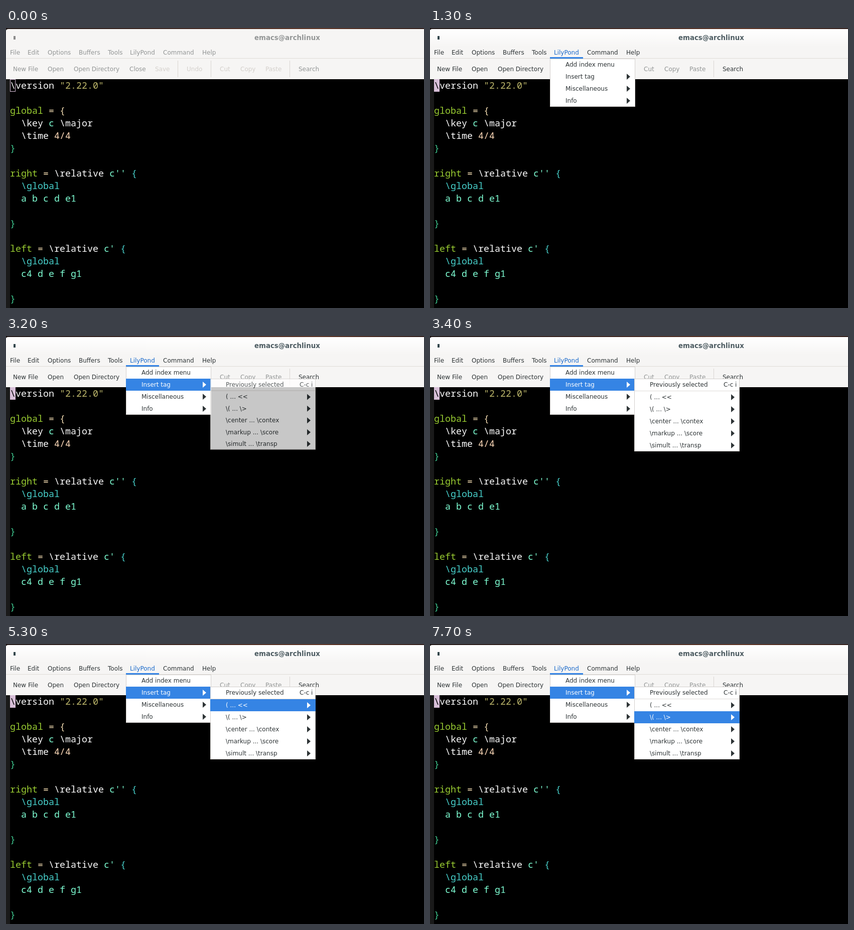
Write an HTML page that moves like this. It is 833 px wide and 558 px high and loops after 8000 ms.

```html
<!DOCTYPE html>
<html lang="en">
<head>
<meta charset="utf-8">
<title>Editor menu</title>
<style>
  html, body { margin: 0; width: 100%; height: 100%; overflow: hidden; background: #000; }
  svg { display: block; width: 833px; height: 558px; }
  text { white-space: pre; font: 12px "DejaVu Sans", sans-serif; }
  .code { font: 18.33px "Noto Sans Mono", monospace; }
  .title { font: bold 13.33px "DejaVu Sans", sans-serif; }
</style>
</head>
<body>
<svg id="stage" viewBox="0 0 833 558">
  <defs>
    <linearGradient id="desk">
      <stop offset="0" stop-color="#1d1413"/><stop offset=".45" stop-color="#3a211b"/>
      <stop offset=".75" stop-color="#5a3020"/><stop offset="1" stop-color="#2c1a17"/>
    </linearGradient>
    <linearGradient id="bar" x2="0" y2="1">
      <stop offset="0" stop-color="#fff"/><stop offset="1" stop-color="#f6f5f4"/>
    </linearGradient>
  </defs>
</svg>
<script>
const LOOP = 8000;
const BLUE = '#3584e4', INK = '#2e3436', PALE = '#929595', FAINT = '#d4d0cc';
const stage = document.getElementById('stage');

function add(parent, tag, attrs, content) {
  const el = document.createElementNS('http://www.w3.org/2000/svg', tag);
  set(el, attrs);
  if (content !== undefined) el.textContent = content;
  parent.appendChild(el);
  return el;
}
function set(el, attrs) {
  for (const key in attrs) el.setAttribute(key, attrs[key]);
}
const rect = (parent, x, y, width, height, fill) =>
  add(parent, 'rect', { x, y, width, height, fill });
const label = (parent, x, y, text, fill = INK, cls = '') =>
  add(parent, 'text', { x, y, fill, class: cls }, text);

function mix(a, b, k) {
  const part = (c, i) => parseInt(c.slice(i, i + 2), 16);
  return `rgb(${[1, 3, 5].map(i => Math.round(part(a, i) + (part(b, i) - part(a, i)) * k))})`;
}

// Window frame
rect(stage, 0, 0, 833, 558, '#000');
rect(stage, 0, 0, 833, 3, 'url(#desk)');
add(stage, 'path', { d: 'M0 102V5Q1 2 5 2H833V102Z', fill: '#f6f5f4' });
const shine = add(stage, 'path', { d: 'M0 38V5Q1 2 5 2H833V38Z', fill: 'url(#bar)' });
rect(stage, 0, 60, 833, 1, '#dfdcd8');
for (const x of [342, 408, 565]) rect(stage, x, 65, 1, 33, '#d9d5d1');
rect(stage, 0, 102, 8, 456, '#1a1a1a');

// Labels that darken when the window gains focus
const inks = [];
function ink(el, off, on) { inks.push({ el, off, on }); return el; }
ink(rect(stage, 15, 16, 4, 7), '#8b8b8b', '#34474c');
ink(label(stage, 495, 24, 'emacs@archlinux', PALE, 'title'), PALE, '#4b5a60');
[[8, 'File'], [43, 'Edit'], [83, 'Options'], [145, 'Buffers'], [203, 'Tools'],
 [247, 'LilyPond'], [313, 'Command'], [391, 'Help']].forEach(([x, text]) =>
  ink(label(stage, x, 53, text), PALE, text === 'LilyPond' ? '#1b6acb' : INK));
[[14, 'New File'], [83, 'Open'], [135, 'Open Directory'], [246, 'Close'], [583, 'Search']]
  .forEach(([x, text]) => ink(label(stage, x, 86, text), PALE, INK));
[[297, 'Save'], [360, 'Undo'], [426, 'Cut'], [467, 'Copy'], [517, 'Paste']]
  .forEach(([x, text]) => ink(label(stage, x, 86, text), FAINT, PALE));
const underline = rect(stage, 239, 58, 66, 3, BLUE);

// Code buffer: row, column, colour, text
const WHITE = '#fff', NAME = '#9acd32', NOTE = '#7fffd4', TEAL = '#48d1cc',
  BRACE = '#3fc890', STRING = '#bdb76b', NUMBER = '#ffdab9', WHEAT = '#f5deb3';
const cursorFill = rect(stage, 8, 102, 11, 25, '#d8bfd8');
const cursorBox = add(stage, 'rect',
  { x: 8.5, y: 102.5, width: 10, height: 24, fill: 'none', stroke: '#d8bfd8' });
const code = ([row, col, fill, text]) =>
  label(stage, 8 + col * 11, 121 + row * 25, text, fill, 'code');
const slash = code([0, 0, WHITE, '\\']);
[
  [0, 1, WHITE, 'version'], [0, 9, STRING, '"2.22.0"'],
  [2, 0, NAME, 'global'], [2, 7, WHEAT, '='], [2, 9, WHEAT, '{'],
  [3, 2, WHITE, '\\key'], [3, 7, NOTE, 'c'], [3, 9, WHITE, '\\major'],
  [4, 2, WHITE, '\\time'], [4, 8, NUMBER, '4/4'],
  [5, 0, BRACE, '}'],
  [7, 0, NAME, 'right'], [7, 6, WHEAT, '='], [7, 8, WHITE, '\\relative'],
  [7, 18, NOTE, "c''"], [7, 22, TEAL, '{'],
  [8, 2, TEAL, '\\global'], [9, 2, NOTE, 'a b c d e1'],
  [11, 0, BRACE, '}'],
  [13, 0, NAME, 'left'], [13, 5, WHEAT, '='], [13, 7, WHITE, '\\relative'],
  [13, 17, NOTE, "c'"], [13, 20, TEAL, '{'],
  [14, 2, TEAL, '\\global'], [15, 2, NOTE, 'c4 d e f g1'],
  [17, 0, BRACE, '}']
].forEach(code);

// Popup menus
function menu(x, y, width, height) {
  const box = add(stage, 'g', {});
  const back = add(box, 'g', {}), front = add(box, 'g', {});
  rect(back, x, y, width, height, '#d3d0cd');
  rect(back, x + 1, y + 1, width - 2, height - 2, '#fff');
  const bar = rect(back, x, y, width, 24, BLUE);
  return { x, y, width, height, box, back, front, bar, rows: [] };
}
function row(m, top, text, arrow, hint) {
  const parts = [label(m.front, m.x + 31, top + 16, text)];
  if (arrow) {
    const ax = m.x + m.width - 17;
    parts.push(add(m.front, 'path', { d: `M${ax} ${top + 6}l7 6l-7 6z`, fill: INK }));
  }
  if (hint) parts.push(label(m.front, m.x + 178, top + 16, hint));
  m.rows.push({ top, parts });
}
// A growing menu squeezes its rows towards the top edge without squeezing the glyphs.
function show(m, alpha, active, grow = 1) {
  set(m.box, { opacity: alpha, visibility: alpha ? 'visible' : 'hidden' });
  set(m.back, { transform: `translate(0 ${m.y * (1 - grow)}) scale(1 ${grow})` });
  set(m.bar, { visibility: alpha && active >= 0 ? 'visible' : 'hidden' });
  m.rows.forEach((r, i) => {
    if (i === active) set(m.bar, { y: r.top });
    const dy = (r.top - m.y) * (grow - 1);
    for (const p of r.parts)
      set(p, { fill: i === active ? '#fff' : INK, transform: `translate(0 ${dy})` });
  });
}

const main = menu(239, 61, 170, 96);
['Add index menu', 'Insert tag', 'Miscellaneous', 'Info']
  .forEach((text, i) => row(main, 61 + 24 * i, text, i > 0));

const tags = menu(407, 85, 210, 145);
rect(tags.back, 407, 109, 210, 1, '#dedbd8');
row(tags, 85, 'Previously selected', false, 'C-c i');
['( ... <<', '\\( ... \\>', '\\center ... \\contex', '\\markup ... \\score', '\\simult ... \\transp']
  .forEach((text, i) => row(tags, 110 + 24 * i, text, true));

const radios = menu(615, 110, 98, 96);
['(', '[', '<', '<<'].forEach((text, i) => {
  const cy = 122 + 24 * i;
  add(radios.front, 'circle',
    { cx: 629, cy, r: 7.5, fill: '#fff', stroke: INK, 'stroke-width': 1.2 });
  if (!i) add(radios.front, 'circle', { cx: 629, cy, r: 4, fill: INK });
  label(radios.front, 644, cy + 4, text);
});

// Latest value whose start time has passed
const at = (t, keys) => keys.reduce((v, [start, value]) => t >= start ? value : v, keys[0][1]);

function draw(t) {
  const focus = at(t, [[0, 0], [1100, .5], [1200, .9], [1300, 1]]);
  for (const { el, off, on } of inks) set(el, { fill: mix(off, on, focus) });
  set(shine, { opacity: focus });
  set(underline, { opacity: focus });
  set(cursorFill, { opacity: focus ? 1 : 0 });
  set(cursorBox, { opacity: focus ? 0 : 1 });
  set(slash, { fill: focus ? '#000' : WHITE });

  show(main, at(t, [[0, 0], [1200, .78], [1300, 1]]),
    at(t, [[0, -1], [2500, 0], [3100, 1]]), at(t, [[0, .976], [1300, 1]]));
  show(tags, at(t, [[0, 0], [3200, .78], [3400, 1]]),
    at(t, [[0, -1], [4200, 0], [5300, 1], [7700, 2]]), at(t, [[0, .976], [3400, 1]]));
  show(radios, at(t, [[0, 0], [5700, 1], [7700, 0]]), -1);
}

const begin = performance.now();
function tick() {
  draw((performance.now() - begin) % LOOP);
  requestAnimationFrame(tick);
}
draw(0);
requestAnimationFrame(tick);
</script>
</body>
</html>
```
